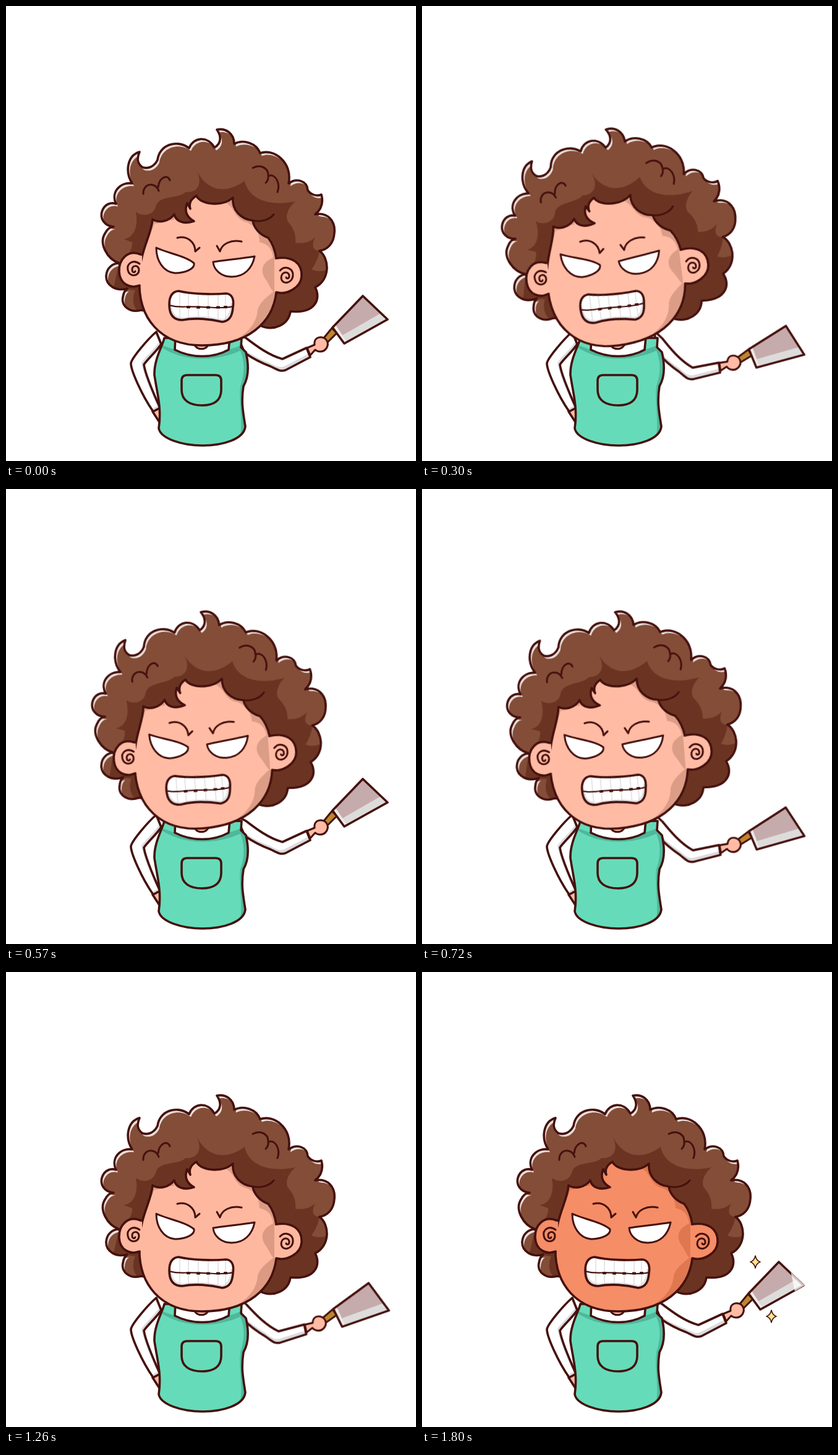
Write an HTML page that moves like this. It is 663 px wide and 736 px high and loops after 1830 ms.

```html
<!DOCTYPE html>
<html lang="en">
<head>
<meta charset="utf-8">
<title>Angry cook</title>
<style>
  html, body { margin: 0; width: 100%; height: 100%; overflow: hidden; background: #fff; }
  svg { display: block; width: 100%; height: 100%; }

  .line { fill: none; stroke: #45110e; stroke-width: 3.6; stroke-linejoin: round; stroke-linecap: round; }
  .fine { stroke-width: 3; }
  .white { fill: #fff; }
  .grey { fill: #dcdadc; }
  .hand { fill: #ffbba4; }
  .brown { fill: #834d38; }
  .dark { fill: #6b3422; }
  .apron { fill: #66dbb9; }
  .apron-shade { fill: #4fb89c; }

  #head, #arm, .cloud, .star, #glint, .skin, .shade {
    animation: 1830ms infinite cubic-bezier(.37, 0, .63, 1);
  }
  #head { transform-origin: 318px 548px; animation-name: shake; }
  #arm { transform-origin: 385px 540px; animation-name: swing; }
  .skin { fill: #ffbba4; animation-name: flush; }
  .shade { fill: #dc9d87; animation-name: flush-shade; }
  .cloud { opacity: 0; animation-name: puff; }
  .star { transform: scale(0); animation-name: twinkle; }
  #glint { opacity: 0; animation-name: glint; animation-timing-function: linear; }

  @keyframes shake {
    0%, 6.56%, 25.41%, 44.81%, 100% { transform: rotate(0deg); }
    16.12%, 35.79% { transform: rotate(-7.2deg); }
  }
  @keyframes swing {
    0%, 1.64%, 31.15%, 88.52%, 100% { transform: rotate(0deg); }
    17.76%, 40.98%, 76.5% { transform: rotate(14.2deg); }
    59.56% { transform: rotate(4deg); }
  }
  @keyframes flush {
    0%, 45.9%, 67.21% { fill: #ffbba4; }
    50.82%, 59.02% { fill: #f4916c; }
    77.05%, 100% { fill: #f58d67; }
  }
  @keyframes flush-shade {
    0%, 45.9%, 67.21% { fill: #dc9d87; }
    50.82%, 59.02%, 77.05%, 100% { fill: #df7850; }
  }
  @keyframes puff {
    0%, 45.9% { opacity: 0; transform: scale(.3); }
    47.54% { opacity: 1; }
    52.46% { opacity: 1; transform: scale(1); }
    60.66% { opacity: 1; transform: scale(1.03); }
    65.57%, 100% { opacity: 0; transform: scale(1.03); }
  }
  @keyframes twinkle {
    0%, 86.9% { transform: scale(0); }
    91.8%, 100% { transform: scale(1); }
  }
  @keyframes glint {
    0%, 88.51% { opacity: 0; transform: translate(-72px, 40px); }
    88.52% { opacity: .75; transform: translate(-72px, 40px); }
    98.36%, 100% { opacity: .75; transform: none; }
  }
</style>
</head>
<body>
<svg viewBox="0 0 663 736">
  <defs>
    <path id="hair" d="M218 492C200 497 186 485 189 471C190 464 192 460 196 457C178 462 161 452 162 436C163 424 172 416 183 416C163 409 150 384 160 368C164 360 169 357 174 357C160 356 152 345 155 333C159 320 170 317 178 320C169 302 184 284 204 287C192 268 196 242 216 236C211 247 213 256 221 261C231 264 240 259 245 249C248 224 277 215 296 230C303 212 326 209 337 229C349 222 348 210 341 200C355 197 369 206 369 223C384 215 405 222 411 238C432 230 464 252 457 287C470 277 487 283 488 298C493 306 503 308 510 305C513 316 511 328 500 337C520 333 533 348 531 367C530 384 520 394 507 396C523 408 525 442 500 455C510 474 500 498 460 494C457 515 433 528 409 516Z"/>
    <path id="face" d="M237 345C248 352 264 348 272 337C275 350 290 353 304 348C292 342 288 331 293 319L298 328C295 318 301 311 308 307C315 322 350 325 367 310C365 330 380 345 399 347C401 360 411 370 424 375C431 384 435 394 437 408L437 464C431 512 392 549 317 549C252 549 212 507 216 440C216 395 235 372 237 345Z"/>
    <path id="body" d="M256 537C254 548 239 572 240 597C244 625 252 650 247 683C250 700 285 711 318 711C350 711 385 701 387 680C383 655 380 640 384 615C393 600 393 582 388 560L380 552L381 537Z"/>
    <path id="mouth" d="M279 461C300 466 335 467 356 465C366 466 369 475 367 487C366 501 362 509 350 511C330 506 305 504 285 508C270 508 264 498 264 483C264 470 268 462 279 461Z"/>
    <path id="sleeve-l" d="M243 527C228 540 203 570 202 578C202 590 220 630 238 656L249 650C240 630 225 595 223 580C230 570 244 558 251 547Z"/>
    <path id="sleeve-r" d="M372 528L388 537C405 550 425 565 447 571L486 553L492 568L452 589C444 592 438 588 428 583C412 577 400 571 386 561Z"/>
    <path id="hand" d="M487 553L499 548C497 534 513 533 518 540C524 549 517 559 508 559C504 559 502 558 500 556L492 565Z"/>
    <path id="blade" d="M577 469L617 507L547 546L528 520Z"/>
    <path id="cloud-a" d="M127 298L102 283C108 274 128 279 133 262C136 246 120 242 114 246C112 234 95 231 87 236C80 240 79 246 80 250C65 247 50 256 53 268C55 278 64 281 72 280C75 280 74 283 71 284C62 282 58 292 62 298C56 312 66 320 77 318C90 320 97 310 97 304C100 299 98 295 100 293L123 309"/>
    <path id="cloud-b" d="M497 229L507 207C495 208 489 198 493 188C496 181 502 180 503 180C493 170 500 155 515 153C522 152 528 155 530 158C535 148 552 146 560 155C567 164 563 175 560 178C568 184 568 198 560 205C553 210 546 208 543 205C538 214 525 215 519 210L506 235"/>
    <path id="cloud-c" d="M121 484L97 489C96 478 84 471 75 474C72 474 70 479 70 480C58 474 42 482 42 494C42 505 52 508 57 506C52 520 60 531 74 531C79 531 82 530 83 530C85 545 100 549 110 544C116 540 118 538 117 535C128 535 131 522 128 517C122 511 112 514 109 513C116 505 112 500 107 499L119 490"/>
    <path id="star" d="M0 -10Q1.8 -1.8 8 0Q1.8 1.8 0 10Q-1.8 1.8 -8 0Q-1.8 -1.8 0 -10Z" fill="#ffe48c" stroke="#45110e" stroke-width="1.6" stroke-linejoin="round"/>
    <clipPath id="in-hair"><use href="#hair"/></clipPath>
    <clipPath id="in-face"><use href="#face"/></clipPath>
    <clipPath id="in-body"><use href="#body"/></clipPath>
    <clipPath id="in-mouth"><use href="#mouth"/></clipPath>
    <clipPath id="in-left"><use href="#sleeve-l"/></clipPath>
    <clipPath id="in-right"><use href="#sleeve-r"/></clipPath>
    <clipPath id="in-blade"><path d="M577 467L619 507L547 548L526 520Z"/></clipPath>
    <clipPath id="in-a"><use href="#cloud-a"/></clipPath>
    <clipPath id="in-b"><use href="#cloud-b"/></clipPath>
    <clipPath id="in-c"><use href="#cloud-c"/></clipPath>
  </defs>

  <!-- steam -->
  <g class="cloud" style="transform-origin:135px 308px">
    <use href="#cloud-a" class="grey"/>
    <g clip-path="url(#in-a)"><use href="#cloud-a" class="white" x="-4" y="-5"/></g>
    <use href="#cloud-a" class="line"/>
  </g>
  <g class="cloud" style="transform-origin:500px 240px">
    <use href="#cloud-b" class="grey"/>
    <g clip-path="url(#in-b)"><use href="#cloud-b" class="white" x="-4" y="-5"/></g>
    <use href="#cloud-b" class="line"/>
  </g>
  <g class="cloud" style="transform-origin:130px 483px">
    <use href="#cloud-c" class="grey"/>
    <g clip-path="url(#in-c)"><use href="#cloud-c" class="white" x="-4" y="-5"/></g>
    <use href="#cloud-c" class="line"/>
  </g>

  <!-- arm on the hip -->
  <path class="hand" d="M237 656L249 650L248 673Z"/>
  <path class="line" d="M248 673L237 656L249 650"/>
  <use href="#sleeve-l" class="grey"/>
  <g clip-path="url(#in-left)"><use href="#sleeve-l" class="white" x="-4" y="-3"/></g>
  <use href="#sleeve-l" class="line"/>

  <!-- arm with the cleaver -->
  <g id="arm">
    <path d="M513 538L527 521L535 529L519 545Z" fill="#bd862d"/>
    <path class="line fine" d="M513 538L527 521L535 529L519 545Z"/>
    <use href="#blade" fill="#c6abac"/>
    <path d="M617 507L606 497L540 535L547 546Z" fill="#dddcdb"/>
    <path d="M528 520L533 516L551 543L547 546Z" fill="#eeebea"/>
    <use href="#blade" class="line"/>
    <g clip-path="url(#in-blade)">
      <path id="glint" class="white" d="M594 474L607 482L624 510L604 522Z"/>
    </g>
    <use href="#hand" class="hand"/>
    <use href="#hand" class="line fine"/>
    <use href="#sleeve-r" class="grey"/>
    <g clip-path="url(#in-right)"><use href="#sleeve-r" class="white" x="-2" y="-6"/></g>
    <use href="#sleeve-r" class="line"/>
  </g>

  <!-- body -->
  <use href="#body" class="apron"/>
  <g clip-path="url(#in-body)" class="apron-shade">
    <path d="M244 546C280 578 350 578 392 550V545L360 556H273Z"/>
    <path d="M378 555C387 575 386 595 379 615C376 640 383 665 379 695L395 690V550Z"/>
    <path d="M238 590C244 610 250 640 250 660L236 660Z"/>
  </g>
  <path class="white" d="M274 535L273 556C300 570 335 570 360 556L362 535Z"/>
  <path class="line" d="M274 535L273 556C300 570 335 570 360 556L362 535"/>
  <path class="hand" d="M303 545C308 558 324 558 329 545Z"/>
  <path class="line fine" d="M303 545C308 558 324 558 329 545"/>
  <use href="#body" class="line"/>
  <path class="line" d="M293 597H339Q348 597 348 606V621C348 639 335 646 317 646C297 646 284 638 284 621V606Q284 597 293 597Z"/>

  <g id="head">
    <!-- hair -->
    <use href="#hair" fill="#eadfda"/>
    <g clip-path="url(#in-hair)">
      <use href="#hair" class="brown" x="3" y="4.5"/>
      <path class="brown" d="M455 340L500 338L540 350V530H400V400Z"/>
      <path class="dark" d="M183 415C198 405 205 392 204 382L190 377C204 376 215 360 210 333C222 342 238 338 242 325C246 305 282 312 290 301C312 303 318 285 308 265C322 295 350 308 386 283C392 312 425 325 468 316C452 330 452 345 457 350C467 362 469 372 468 383C480 385 492 382 500 374C494 386 495 396 507 396C505 408 500 418 494 426C502 430 511 430 522 426L510 530H200L214 495C204 485 204 470 209 460L174 455Z"/>
    </g>
    <use href="#hair" class="line"/>
    <path class="line fine" d="M222 304C221 287 241 283 247 299M246 293C248 276 262 272 265 282M399 262C409 256 424 260 424 274C425 280 423 283 420 286M424 275C436 270 444 287 439 301"/>

    <!-- face -->
    <use href="#face" class="skin"/>
    <g clip-path="url(#in-face)" class="shade">
      <path d="M350 316C373 324 366 344 390 350C404 357 410 368 410 382C425 385 431 395 432 407C413 415 410 430 421 444C428 455 430 463 438 466L450 455V300Z"/>
      <path d="M442 455C422 470 411 478 407 491C405 520 382 538 345 552H450Z"/>
      <path d="M230 340L270 333L272 346C260 346 252 352 240 352L231 374Z"/>
    </g>
    <use href="#face" class="line"/>
    <path class="line fine" d="M399 347C414 350 427 345 433 337"/>

    <!-- ears cover the cheek line -->
    <path class="skin" d="M220 404C197 393 182 410 183 430C184 449 200 458 220 451Z"/>
    <path class="line" d="M218 402C197 393 182 410 183 430C184 449 200 458 216 452"/>
    <path class="line fine" d="M216 417C205 409 195 417 197 427C199 439 215 438 215 427C215 418 203 419 204 427C204 431 208 432 209 429"/>
    <path class="skin" d="M434 410C463 404 479 416 478 437C477 455 455 468 434 463Z"/>
    <path class="line" d="M437 408C463 404 479 416 478 437C477 455 455 468 437 463"/>
    <path class="line fine" d="M443 428C451 419 464 424 464 435C464 449 446 452 445 440C445 429 458 428 458 437C458 441 454 442 453 439"/>

    <!-- features -->
    <path class="line fine" d="M277 375C292 371 306 381 306 397L313 391M381 381C364 377 349 385 346 397L341 388"/>
    <g class="white">
      <path id="eye-l" d="M243 391C262 400 290 404 304 416C306 425 290 432 273 432C254 430 243 412 243 391Z"/>
      <path id="eye-r" d="M335 414C355 411 385 408 402 405C398 425 385 438 365 438C348 438 336 427 335 414Z"/>
      <use href="#mouth"/>
    </g>
    <use href="#eye-l" class="line fine"/>
    <use href="#eye-r" class="line fine"/>
    <g clip-path="url(#in-mouth)" fill="none">
      <path d="M266 480C267 503 278 506 290 505C315 501 335 505 350 508C360 506 364 494 365 480" stroke="#e2e0e2" stroke-width="3"/>
      <path d="M281 460V510M295 460V510M311 460V510M327 460V510M343 460V510M355 460V510" stroke="#dad7da" stroke-width="1.3"/>
      <path class="line" style="stroke-width:2.2" d="M264 484Q275 487 290 486.5T330 487.5T367 486"/>
      <path d="M292 487H298M308 487.5H314M324 487.5H330M340 487.5H346M352 487H358" stroke="#45110e" stroke-width="4"/>
    </g>
    <use href="#mouth" class="line"/>
  </g>

  <!-- sparkles -->
  <g transform="translate(539 469)"><use href="#star" class="star"/></g>
  <g transform="translate(565 557)"><use href="#star" class="star"/></g>
</svg>
</body>
</html>
```
